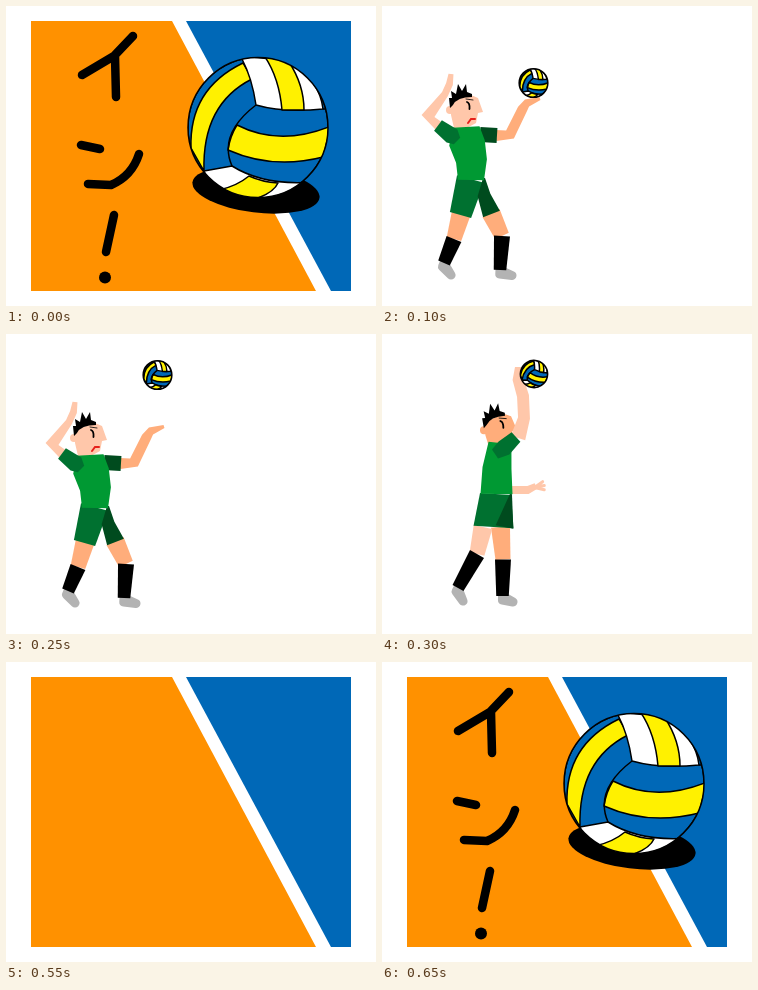
Animation, 370 px wide and 300 px high, one loop 1000 ms. Source, as an HTML page:

```html
<!DOCTYPE html>
<html lang="ja">
<head>
<meta charset="utf-8">
<title>Volleyball serve</title>
<style>
html, body { margin: 0; width: 100%; height: 100%; overflow: hidden; background: #fff; }
svg { display: block; width: 370px; height: 300px; }
#ball * { vector-effect: non-scaling-stroke; }
</style>
</head>
<body>
<svg viewBox="0 0 370 300">
  <defs>
    <clipPath id="round"><circle cx="252" cy="121.5" r="70"/></clipPath>
    <g id="ball" transform="translate(-252 -121.5)" stroke="#000" stroke-linejoin="round" fill="#fff100">
      <g clip-path="url(#round)">
        <circle cx="252" cy="121.5" r="70" fill="#0068b7"/>
        <path d="M237 57Q183 83 185 142L198 165Q196 98 246 73Z"/>
        <path fill="#fff" d="M236 50L285 55Q314 76 317 103Q278 107 250 99Q246 72 236 53Z"/>
        <path d="M257 48Q273 70 276 104L298 104Q298 79 283 56Z"/>
        <path d="M231 119Q274 141 325 120L317 151Q267 164 222 144Q224 130 231 119Z"/>
        <path fill="#fff" d="M198 165L226 160Q258 180 307 176L290 196H210Z"/>
        <path d="M243 170Q231 180 213 184L235 196L252 192Q268 186 272 177Q256 176 243 170Z"/>
        <path fill="none" d="M250 99Q212 128 226 160M317 103H325"/>
      </g>
      <circle cx="252" cy="121.5" r="70" fill="none"/>
    </g>
  </defs>
  <g id="court">
    <path fill="#ff9100" d="M25 15H166L310 285H25Z"/>
    <path fill="#0068b7" d="M180 15H345V285H325Z"/>
    <ellipse id="shadow" cx="250" cy="184" rx="64" ry="22.5" transform="rotate(7 250 184)"/>
  </g>
  <g id="player"></g>
  <use id="shot" href="#ball" stroke-width="1.5"/>
  <g id="call" role="img" aria-label="イン！">
    <path fill="none" stroke="#000" stroke-width="8.5" stroke-linecap="round" stroke-linejoin="round"
      d="M127 30L108 50L76 69M109 50L110 91M75 139L94 143M133 148Q126 170 105 179L82 178M108 209L100 246"/>
    <circle cx="99" cy="271.5" r="6"/>
  </g>
</svg>
<script>
const STEP = 50, LOOP = 1000;
const $ = id => document.getElementById(id);

const green = '#009933', mid = '#007130', deep = '#004b1e';
const skin = '#ffad7b', pale = '#ffc7aa', grey = '#b3b3b3', black = '#000', red = '#e6211b';

const line = (color, width, d) =>
  `<path fill="none" stroke="${color}" stroke-width="${width}" stroke-linecap="round" d="${d}"/>`;

// A band through joints [x, y, width], its edges square to the local direction
function band(color, ...joints) {
  const left = [], right = [];
  joints.forEach(([x, y, width], i) => {
    const a = joints[Math.max(i - 1, 0)];
    const b = joints[Math.min(i + 1, joints.length - 1)];
    const dx = b[0] - a[0], dy = b[1] - a[1];
    const k = width / 2 / Math.hypot(dx, dy);
    left.push([x - dy * k, y + dx * k]);
    right.unshift([x + dy * k, y - dx * k]);
  });
  return `<polygon fill="${color}" points="${[...left, ...right].join(' ')}"/>`;
}

function leg(color, hip, knee, ankle, toe) {
  const dx = ankle[0] - knee[0], dy = ankle[1] - knee[1];
  const k = 4 / Math.hypot(dx, dy);
  const heel = [ankle[0] + dx * k, ankle[1] + dy * k];
  return band(color, [...hip, 19], [...knee, 15]) +
    `<polygon fill="${grey}" stroke="${grey}" stroke-width="9" stroke-linejoin="round" points="${[ankle, heel, toe]}"/>` +
    band(black, [...knee, 16], [...ankle, 12.5]);
}

function fingers(color, x, y, angle) {
  let d = '';
  for (let i = -1; i <= 1; i++) {
    const a = angle + i * 0.42;
    d += `M${x} ${y}l${10 * Math.cos(a)} ${10 * Math.sin(a)}`;
  }
  return line(color, 3, d);
}

const head = (color, x, y, turn, mouth) => `
  <g transform="translate(${x} ${y}) rotate(${turn})">
    <circle cx="-17" cy="-1" r="4" fill="${color}"/>
    <path fill="${color}" d="M-16 -9L4 -16L11 -13L16 1L11 2L9 12L0 17H-13L-16 4Z"/>
    <path d="M-17 -3L-18 -13H-15L-16 -20L-11 -17L-9 -27L-5 -20L-1 -27L0 -19L5 -17V-14Q-10 -14 -14 -6Z"/>
    ${line(black, 0.8, 'M-1 -12L6 -11')}
    ${line(black, 1.8, 'M0 -9Q3 -8 2.5 -2')}
    ${line(red, 2, mouth)}
  </g>`;

const toss = (...arm) => [
  band(skin, ...arm),
  leg(skin, [109, 207], [120, 230], [118, 264], [130, 269.5]),
  leg(skin, [79, 208], [72, 233], [62, 257], [69, 269]),
  band(mid, [88.5, 173, 28], [78.5, 209, 22]),
  band(deep, [102, 172, 2], [102, 189, 13], [109.5, 208, 18]),
  band(pale, [69, 68, 5], [67.5, 78, 7], [63, 88, 7], [46, 110, 13], [58, 121, 10]),
  head(pale, 85, 105, 0, 'M1 12L4 8H8'),
  band(deep, [98, 128.5, 15], [115, 129.5, 15]),
  band(green, [84, 121, 27], [85, 137, 36], [89.5, 155, 31], [89, 174, 26]),
  band(mid, [56, 119.5, 13], [70, 130, 17], [75, 135, 9])
].join('');

const poses = {
  hold: toss([112, 131.5, 11], [126, 134.5, 15], [149, 110, 9], [162, 108, 4]),
  lift: toss([114, 129.5, 11], [128, 128.5, 11], [140.5, 103, 10], [145, 97, 8], [158, 92.5, 3]),
  hit: [
    band(pale, [129, 156, 8], [146, 156, 8], [154, 152, 6]),
    fingers(pale, 152.5, 153.5, -0.2),
    leg(skin, [118.5, 193], [121, 225.5], [120.5, 262], [131, 268]),
    leg(pale, [101, 193], [95, 220], [76, 254], [81, 267]),
    band(mid, [113.5, 160, 31], [111.5, 193, 40]),
    band(deep, [129, 160, 2], [122.5, 193, 18]),
    head(skin, 119, 96, -4, ''),
    band(green, [118, 109, 23], [115, 134, 29], [114.5, 160, 32]),
    band(pale, [136, 33, 6], [136, 45, 11], [141, 62, 12], [142, 84, 12], [136, 104, 15]),
    band(mid, [134, 103, 13], [122, 114, 17], [113, 120, 11])
  ].join(''),
  follow: [
    band(pale, [134, 153.5, 10], [153, 149, 9]),
    fingers(skin, 159, 145.5, -0.3),
    band(skin, [151, 149, 8], [161, 143, 8]),
    leg(skin, [125, 206], [123.5, 230.5], [119.5, 260], [132, 267]),
    leg(pale, [110, 206], [104, 228.5], [82, 254], [89, 267]),
    band(mid, [118.5, 172, 31], [118, 188, 31], [118, 206, 37]),
    band(deep, [133.5, 173, 2], [128.5, 206, 17]),
    head(skin, 118, 101, -10, 'M7 7L12 8'),
    band(green, [117, 113.5, 15], [121.5, 128, 29], [119, 172, 30]),
    fingers(pale, 175, 64.5, -0.55),
    band(pale, [146, 111, 12], [162, 91, 12], [172, 73, 10], [176, 62, 7]),
    band(mid, [147, 109, 14], [134, 121, 17], [127, 126, 12])
  ].join('')
};

function show(id, on) { $(id).style.display = on ? '' : 'none'; }

function placeBall(x, y, scale, turn = 0) {
  $('shot').setAttribute('transform', `translate(${x} ${y}) rotate(${turn}) scale(${scale})`);
  show('shot', true);
}

let shown = -1;
function draw(time) {
  const step = Math.floor((time % LOOP) / STEP);
  if (step === shown) return;
  shown = step;

  const serving = step >= 1 && step < 11;
  const landed = step === 0 || step >= 12;
  show('court', !serving);
  show('player', serving);
  show('shadow', landed);
  show('call', step === 0 || step >= 13);
  show('shot', false);

  if (landed) placeBall(252, 121.5, 1);
  if (!serving) return;

  const pose = step < 2 ? 'hold' : step < 6 ? 'lift' : step < 7 ? 'hit' : 'follow';
  $('player').innerHTML = poses[pose];
  if (step < 6) {
    // the toss slows down as it rises
    const n = step - 1;
    placeBall(151.5, 95 - 19.5 * n + 1.5 * n * n, 0.205);
  } else if (step === 6) {
    placeBall(152, 40, 0.195, 12);
  } else if (step === 7) {
    placeBall(255, 85, 0.2, 60);
  }
}

function tick() {
  draw(performance.now());
  requestAnimationFrame(tick);
}
draw(0);
requestAnimationFrame(tick);
</script>
</body>
</html>
```
